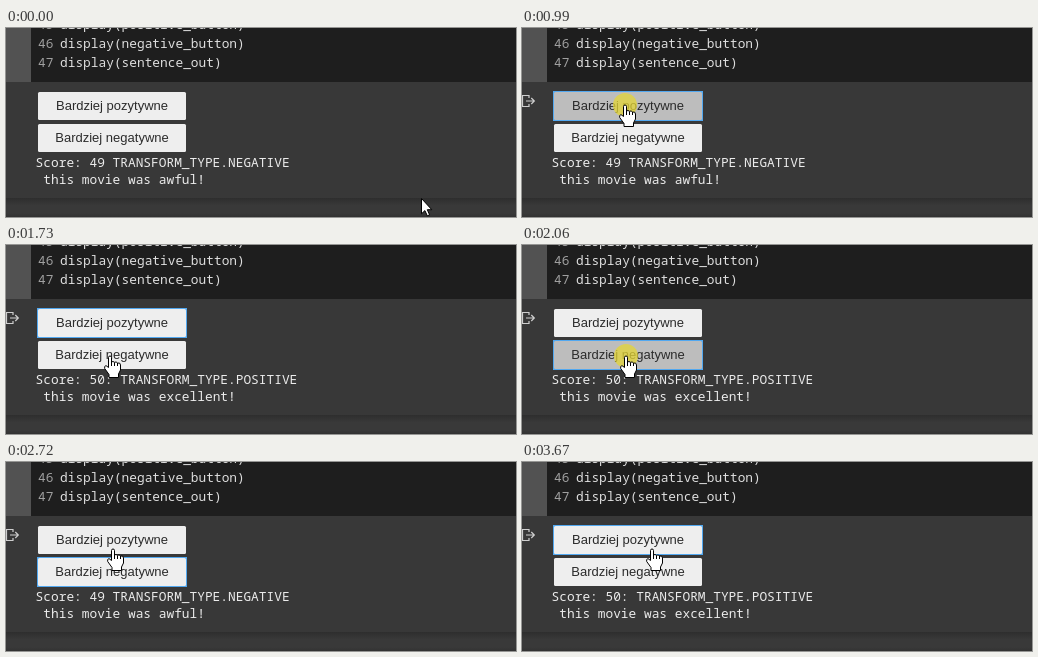
Recreate the animation shown at these times as an HTML page. Size 510 px wide and 189 px high, loop 3740 ms.

```html
<!DOCTYPE html>
<html lang="pl">
<head>
<meta charset="utf-8">
<title>Sentence buttons</title>
<style>
  html, body { margin: 0; width: 100%; height: 100%; overflow: hidden; background: #383838; }
  svg { display: block; }
  .mono { font: 12.83px "Noto Sans Mono", "DejaVu Sans Mono", monospace; fill: #dedede; }
  .num { fill: #a0a0a0; }
  .out { fill: #ebebeb; }
  .label { font: 13px "Liberation Sans", Arial, sans-serif; fill: #2b2b2b; text-anchor: middle; }
</style>
</head>
<body>
<svg width="510" height="189" viewBox="0 0 510 189">
  <defs>
    <linearGradient id="shade" x1="0" y1="0" x2="0" y2="1">
      <stop offset="0" stop-color="#2e2e2e"/>
      <stop offset=".4" stop-color="#393939"/>
      <stop offset=".8" stop-color="#393939"/>
      <stop offset="1" stop-color="#323232"/>
    </linearGradient>
  </defs>

  <rect width="510" height="189" fill="#383838"/>
  <rect width="510" height="54" fill="#1e1e1e"/>
  <rect width="25" height="54" fill="#525252"/>
  <rect y="170" width="510" height="19" fill="url(#shade)"/>

  <g class="mono" id="code"></g>

  <path id="icon" fill="none" stroke="#cfcfcf" stroke-width="1.2"
        d="M7 70V67.5H.5V78.5H7V76M4 73H12M9.3 70L12.3 73L9.3 76"/>

  <g id="buttons"></g>

  <text class="mono out" id="score" x="29.6" y="139"></text>
  <text class="mono out" id="sentence" x="37.3" y="156"></text>

  <circle id="click" r="12" fill="#e4d635" fill-opacity=".75"/>
  <path id="arrow" fill="#fff" stroke="#000" stroke-width="1"
        d="M.5 .5V15.8L3.9 12.6L6.3 17.8L8.6 16.8L6.3 11.7H10.8Z"/>
  <g id="hand" stroke="#000" stroke-width="1" stroke-linejoin="round">
    <path fill="#fff" d="M-1.5 11.5V1.5Q-1.5 0 0 0T1.5 1.5V6Q3 4.8 4.5 6.3Q6.3 5.3 7.5 7Q10.5 6.4 10.5 9V14
                         L8.5 18V21.5H-1V18.5L-5.3 12.5Q-6 10 -4 9.6Z"/>
    <path fill="none" d="M1.5 6V10M4.5 6.5V10M7.5 7V10"/>
  </g>
</svg>
<script>
const LOOP = 3740;
const STEP = LOOP / 56;
const $ = id => document.getElementById(id);

function add(parent, tag, attrs, text = "") {
  const el = document.createElementNS("http://www.w3.org/2000/svg", tag);
  for (const key in attrs) el.setAttribute(key, attrs[key]);
  el.textContent = text;
  return parent.appendChild(el);
}

["positive_button", "negative_button", "sentence_out"].forEach((name, i) => {
  const y = 1 + 19 * i;
  add($("code"), "text", { class: "num", x: 32, y }, 45 + i);
  add($("code"), "text", { x: 54, y }, `display(${name})`);
});

const buttons = ["Bardziej pozytywne", "Bardziej negatywne"].map((label, i) => {
  const y = 64 + 32 * i;
  const ring = add($("buttons"), "rect", { x: 31, y: y - 1, width: 150, height: 30, fill: "#52a8f0" });
  const face = add($("buttons"), "rect", { x: 32, y, width: 148, height: 28, rx: 1.5 });
  add($("buttons"), "text", { class: "label", x: 106, y: y + 18 }, label);
  return { ring, face };
});

const home = { x: 415, y: 170 };
const moves = [
  { from: 0, to: 120, x: 103, y: 77 },
  { from: 1060, to: 1450, x: 104, y: 114 },
  { from: 1660, to: 1720, x: 104, y: 111 },
  { from: 2190, to: 2380, x: 104, y: 115 },
  { from: 2525, to: 2860, x: 109, y: 72 },
  { from: 3395, to: 3660, x: 130, y: 87 }
];

// Press, release and the moment the reply appears
const clicks = [
  { down: 990, up: 1060, reply: 1460, button: 0 },
  { down: 2060, up: 2190, reply: 2590, button: 1 },
  { down: 3130, up: 3260, reply: 3460, button: 0 }
];

const replies = [
  ["Score: 50: TRANSFORM_TYPE.POSITIVE", "this movie was excellent!"],
  ["Score: 49 TRANSFORM_TYPE.NEGATIVE", "this movie was awful!"]
];

const show = (el, on) => el.setAttribute("visibility", on ? "visible" : "hidden");

function ease(t, from, to) {
  const k = Math.min(1, Math.max(0, (t - from) / (to - from)));
  return k * k * (3 - 2 * k);
}

// The pointer is sampled in even steps, so it moves in small jumps.
function pointer(t) {
  const time = Math.floor((t + 20) / STEP) * STEP - 10;
  return moves.reduce((p, m) => {
    const k = ease(time, m.from, m.to);
    return { x: p.x + (m.x - p.x) * k, y: p.y + (m.y - p.y) * k };
  }, home);
}

function draw(t) {
  const { x, y } = pointer(t);
  const last = clicks.findLast(c => c.down <= t);
  const pressed = last && t < last.up;
  const answered = clicks.findLast(c => c.reply <= t);

  buttons.forEach(({ ring, face }, i) => {
    const focused = last && last.button === i;
    show(ring, focused);
    face.setAttribute("fill", focused && pressed ? "#bdbdbd" : "#eeeeee");
  });

  const [score, sentence] = replies[answered ? answered.button : 1];
  $("score").textContent = score;
  $("sentence").textContent = sentence;

  const at = `translate(${Math.round(x)} ${Math.round(y)})`;
  for (const id of ["arrow", "hand", "click"]) $(id).setAttribute("transform", at);
  show($("arrow"), t < 130);
  show($("hand"), t >= 130);
  show($("click"), pressed);
  show($("icon"), t >= 60);
}

const start = performance.now();
function tick() {
  draw((performance.now() - start) % LOOP);
  requestAnimationFrame(tick);
}
tick();
</script>
</body>
</html>
```
